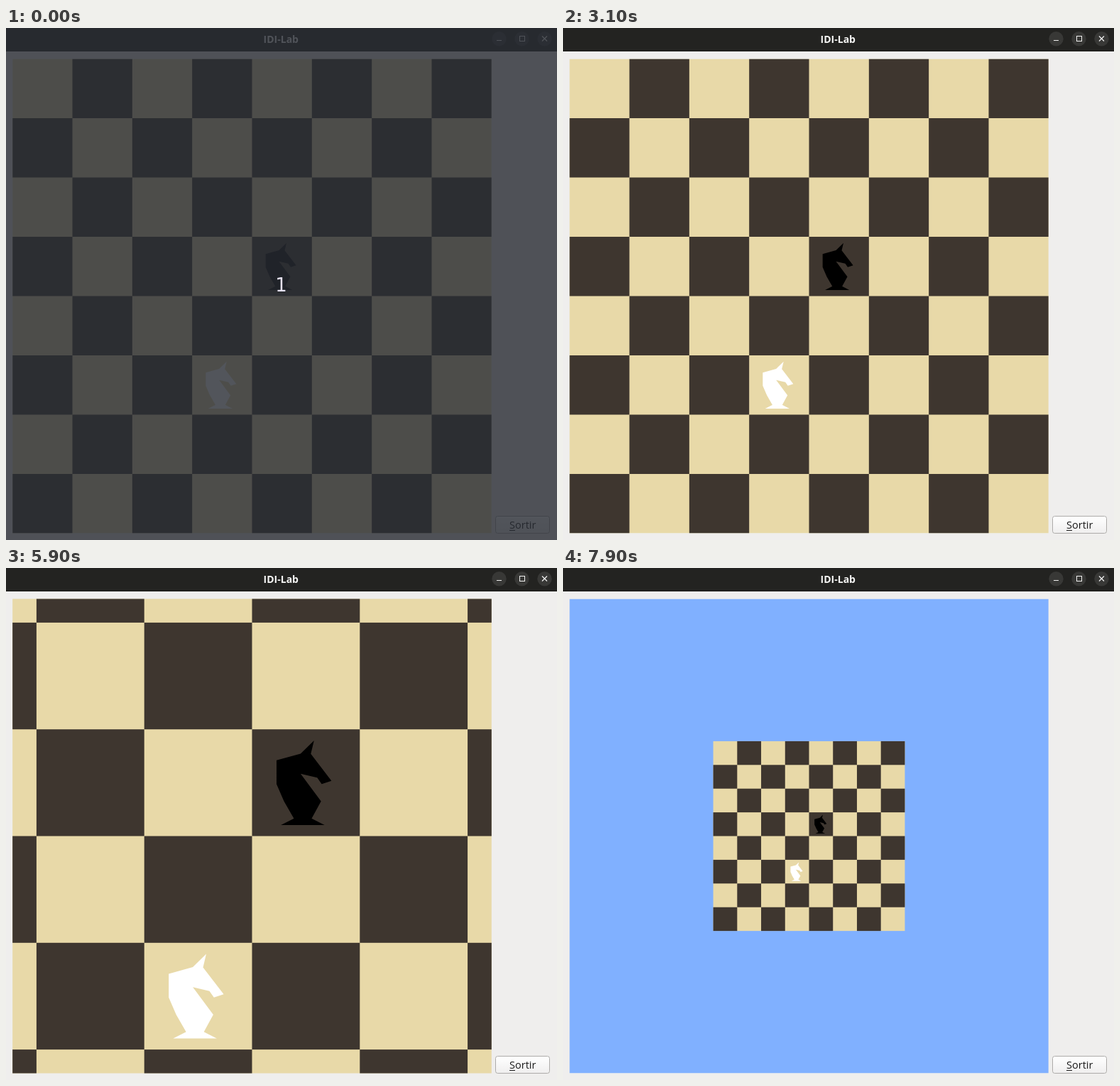
Write an HTML page with a canvas that moves like this. It is 776 by 721 pixels and loops after 8 s.

```html
<!DOCTYPE html>
<html lang="ca">
<head>
<meta charset="utf-8">
<title>IDI-Lab</title>
<style>
html, body { margin: 0; width: 100%; height: 100%; overflow: hidden; background: #efeeed; }
canvas { display: block; width: 776px; height: 721px; }
</style>
</head>
<body>
<canvas id="stage" width="776" height="721"></canvas>
<script>
const ctx = document.getElementById('stage').getContext('2d');
const LOOP = 8000, TICK = 100, REPEAT = 30;
const LIGHT = '#e8d9a8', DARK = '#3e362f', SKY = '#80b0ff';
const FONT = '"Open Sans", "Noto Sans", sans-serif';
const CENTER = { x: 346.5, y: 377.5 };
const CELL = { w: 84.33, h: 83.5 };

// Knight outline, in half pixels from the corner of its square
const KNIGHT = [
  [97, 17.5], [92, 38.5], [124.3, 80.5], [109, 85.5], [102, 75.5],
  [76, 69.5], [108, 112.5], [93.3, 139.5], [113.5, 149.8], [45.2, 149.8],
  [65.5, 139.5], [50, 112.5], [38.3, 85.5], [38.3, 48.5], [76, 38]
];

// Zoom keys: a held key repeats after its delay
const ZOOM_KEYS = [
  { at: 4100, dir: 1, repeats: 9, delay: 410 },
  { at: 5400, dir: -1, repeats: 18, delay: 470 },
  { at: 7200, dir: 1 },
  { at: 7700, dir: 1 },
  { at: 7900, dir: 1 }
];
const SWAP_KEYS = [600, 1600, 2600, 3100];

function taps({ at, repeats = 0, delay = 0 }, t) {
  if (t < at) return 0;
  const repeated = Math.floor((t - at - delay) / REPEAT);
  return 1 + Math.min(repeats, Math.max(0, repeated));
}

const zoomAt = t => ZOOM_KEYS.reduce((steps, key) => steps + key.dir * taps(key, t), 10) / 10;
const swappedAt = t => SWAP_KEYS.filter(at => at <= t).length % 2 === 1;

function rect(x, y, w, h, color) {
  ctx.fillStyle = color;
  ctx.fillRect(x, y, w, h);
}

function label(text, x, y, font, color, align = 'left') {
  ctx.font = font;
  ctx.textAlign = align;
  ctx.fillStyle = color;
  ctx.fillText(text, x, y);
}

function line(x1, y1, x2, y2) {
  ctx.beginPath();
  ctx.moveTo(x1, y1);
  ctx.lineTo(x2, y2);
  ctx.stroke();
}

function drawTitleBar() {
  rect(0, 0, 776, 33, '#232321');
  rect(0, 32, 776, 1, '#1a1a18');
  label('IDI-Lab', 387.3, 21, `bold 14px ${FONT}`, '#f5f5f4', 'center');
  for (let i = 0; i < 3; i++) {
    ctx.beginPath();
    ctx.arc(694.5 + 32 * i, 15.2, 10.2, 0, Math.PI * 2);
    ctx.fillStyle = '#383836';
    ctx.fill();
  }
  ctx.strokeStyle = '#f2f2f0';
  ctx.lineWidth = 1;
  line(691, 17.5, 698, 17.5);
  ctx.strokeRect(723.5, 11.5, 7, 7);
  ctx.lineWidth = 1.2;
  line(755, 11.5, 762, 18.5);
  line(762, 11.5, 755, 18.5);
}

function drawButton() {
  const face = ctx.createLinearGradient(0, 688, 0, 712);
  face.addColorStop(0, '#ffffff');
  face.addColorStop(1, '#efeeee');
  ctx.beginPath();
  ctx.roundRect(689.5, 687.5, 76, 24, 3);
  ctx.fillStyle = face;
  ctx.fill();
  ctx.strokeStyle = '#adaba9';
  ctx.lineWidth = 1;
  ctx.stroke();
  label('Sortir', 709, 705, `14.5px ${FONT}`, '#1a1a1a');
  rect(709, 707, 8, 1, '#1a1a1a');
}

function drawKnight(col, row, zoom, color) {
  const x = CENTER.x + (col - 4) * CELL.w * zoom;
  const y = CENTER.y + (row - 4) * CELL.h * zoom;
  ctx.beginPath();
  for (const [px, py] of KNIGHT) ctx.lineTo(x + px * zoom / 2, y + py * zoom / 2);
  ctx.closePath();
  ctx.fillStyle = color;
  ctx.fill();
}

function drawBoard(zoom, swapped) {
  const w = CELL.w * zoom, h = CELL.h * zoom;
  const left = CENTER.x - 4 * w, top = CENTER.y - 4 * h;
  const view = [CENTER.x - 4 * CELL.w, CENTER.y - 4 * CELL.h, 8 * CELL.w, 8 * CELL.h];
  ctx.save();
  ctx.beginPath();
  ctx.rect(...view);
  ctx.clip();
  if (zoom < 1) rect(...view, SKY);
  rect(left, top, 8 * w, 8 * h, LIGHT);
  for (let row = 0; row < 8; row++) {
    for (let col = (row + 1) % 2; col < 8; col += 2) {
      rect(left + col * w, top + row * h, w, h, DARK);
    }
  }
  drawKnight(4, 3, zoom, swapped ? '#fff' : '#000');
  drawKnight(3, 5, zoom, swapped ? '#000' : '#fff');
  ctx.restore();
}

function drawCountdown() {
  rect(0, 0, 776, 721, 'rgba(41, 44, 51, 0.805)');
  label('1', 387.5, 371, '26px "DejaVu Sans", sans-serif', '#e6e2f2', 'center');
}

function draw(t) {
  rect(0, 0, 776, 721, '#efeeed');
  drawTitleBar();
  drawBoard(zoomAt(t), swappedAt(t));
  drawButton();
  if (t < 100) drawCountdown();
}

const start = performance.now();
function tick() {
  const t = (performance.now() - start) % LOOP;
  draw(Math.floor(t / TICK) * TICK);
  requestAnimationFrame(tick);
}
tick();
</script>
</body>
</html>
```
